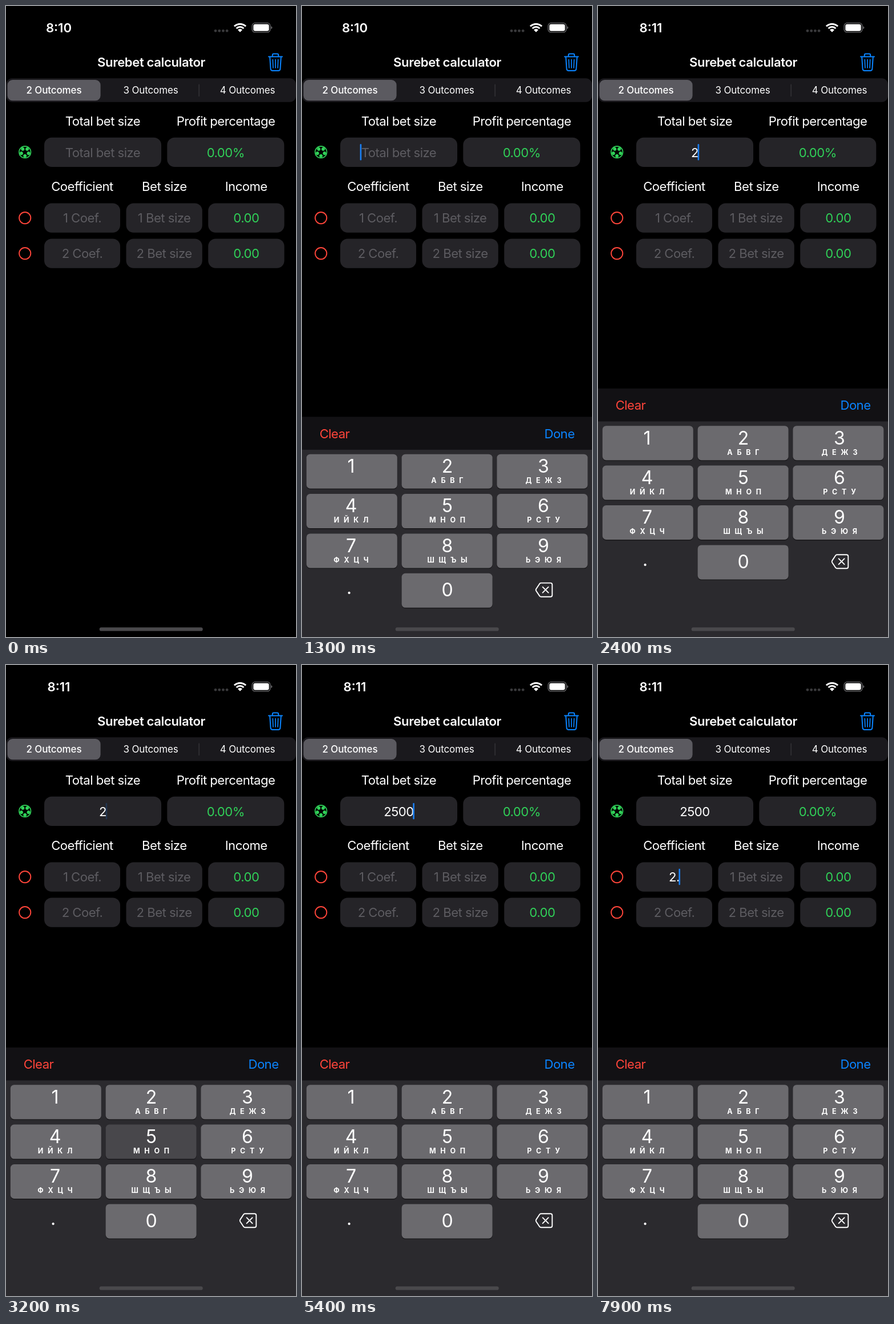
Animation of 508x1102 px, one loop 8 s. Source, as an HTML page:

```html
<!DOCTYPE html>
<html lang="en">
<head>
<meta charset="utf-8">
<title>Surebet calculator</title>
<style>
html, body { margin: 0; width: 100%; height: 100%; overflow: hidden; background: #000; }
svg { display: block; width: 100vw; height: 100vh; }
text { font-family: Inter, Roboto, sans-serif; font-size: 22.14px; letter-spacing: -.024em; fill: #fff; text-anchor: middle; white-space: pre; }
.title { font-weight: 600; letter-spacing: -.018em; }
.clock { font-weight: 600; letter-spacing: 0; }
.tab { font-size: 16.93px; letter-spacing: -.005em; }
.on { font-weight: 500; }
.hint { fill: #5d5c61; }
.num { fill: #30d158; }
.digit { font-size: 32px; letter-spacing: 0; }
.sub { font-size: 12.5px; font-weight: 700; letter-spacing: 2.4px; }
.red { fill: #ff453a; }
.blue { fill: #0a84ff; }
.line { fill: none; stroke-linecap: round; stroke-linejoin: round; }
</style>
</head>
<body>
<svg id="stage" viewBox="0 0 508 1102"></svg>
<script>
const LOOP = 8000, STEP = 100;
const KEYS_AT = 1096, KEYS_RISE = 434, SPRING = 18.26;
const MINUTE_AT = 2100;
const stage = document.getElementById('stage');

function add(parent, tag, attrs, content) {
  const el = document.createElementNS('http://www.w3.org/2000/svg', tag);
  for (const k in attrs) el.setAttribute(k, attrs[k]);
  if (content !== undefined) el.textContent = content;
  parent.appendChild(el);
  return el;
}
const rect = (p, x, y, width, height, rx, fill) => add(p, 'rect', { x, y, width, height, rx, fill });
const text = (p, x, y, s, cls = '') => add(p, 'text', { x, y, class: cls }, s);
const line = (p, d, stroke, width) => add(p, 'path', { d, stroke, 'stroke-width': width, class: 'line' });
const polar = (cx, cy, r, deg) => {
  const a = deg * Math.PI / 180;
  return [cx + r * Math.cos(a), cy + r * Math.sin(a)];
};

// Status bar
const clock = text(stage, 92.5, 46, '8:10', 'clock');
for (let i = 0; i < 4; i++) add(stage, 'circle', { cx: 367 + i * 6.7, cy: 43.3, r: 2.4, fill: '#3a3a3c' });
function arc(r, width) {
  const [x1, y1] = polar(410, 45.6, r, -135), [x2, y2] = polar(410, 45.6, r, -45);
  add(stage, 'path', { d: `M${x1} ${y1}A${r} ${r} 0 0 1 ${x2} ${y2}`, fill: 'none', stroke: '#fff', 'stroke-width': width });
}
arc(14.2, 3);
arc(9, 3);
add(stage, 'path', { d: 'M410 45.8L406 41.7A5.6 5.6 0 0 1 414 41.7Z', fill: '#fff' });
add(stage, 'rect', { x: 431.2, y: 29.7, width: 31.6, height: 16.2, rx: 5, fill: 'none', stroke: '#6c6c6f', 'stroke-width': 1.3 });
rect(stage, 433.3, 31.8, 27.4, 12, 3.2, '#fff');
add(stage, 'path', { d: 'M464.3 35.2Q466.4 36 466.4 37.8T464.3 40.4Z', fill: '#6c6c6f' });

// Title bar
text(stage, 254.5, 105.5, 'Surebet calculator', 'title');
line(stage, 'M460 88.6H484M466.8 88V85.5Q466.8 83.4 469 83.4H475Q477.2 83.4 477.2 85.5V88' +
  'M462.2 89L463.6 109.8Q463.8 113 467 113H477Q480.2 113 480.4 109.8L481.8 89', '#0a84ff', 2);
line(stage, 'M467.3 93.5L467.9 108M472 93.5V108M476.7 93.5L476.1 108', '#0a84ff', 1.7);

// Tabs
rect(stage, 0, 126.3, 508, 41.5, 11, '#1a191d');
rect(stage, 2.6, 129, 163, 36.3, 9, '#5b5a60');
rect(stage, 337.5, 136.5, 1.2, 21.5, .6, '#3b3a3e');
[2, 3, 4].forEach((n, i) => text(stage, 84 + i * 169.5, 153, n + ' Outcomes', i ? 'tab' : 'tab on'));

// Form
const field = (x, y, w, s, cls) => {
  rect(stage, x, y, w, 51.4, 13, '#252428');
  return text(stage, x + w / 2, y + 34, s, cls);
};
text(stage, 169.5, 208.5, 'Total bet size');
text(stage, 385, 208.5, 'Profit percentage');
const total = field(67, 229.7, 205, 'Total bet size', 'hint');
field(282.3, 229.7, 205, '0.00%', 'num');

text(stage, 133.5, 323.3, 'Coefficient');
text(stage, 277.3, 323.3, 'Bet size');
text(stage, 420.7, 323.3, 'Income');
const coefs = [1, 2].map(n => {
  const y = 344.4 + (n - 1) * 62;
  add(stage, 'circle', { cx: 33.2, cy: y + 25.7, r: 10.1, fill: 'none', stroke: '#ff453a', 'stroke-width': 1.9 });
  const coef = field(67, y, 133, n + ' Coef.', 'hint');
  field(210.5, y, 133.3, n + ' Bet size', 'hint');
  field(354.2, y, 133.3, '0.00', 'num');
  return coef;
});

// Ball: a ring with five patches around a dark centre
add(stage, 'circle', { cx: 33.2, cy: 255.2, r: 10.3, fill: 'none', stroke: '#30d158', 'stroke-width': 1.6 });
for (let i = 0; i < 5; i++) {
  const dir = 90 + i * 72, [cx, cy] = polar(33.2, 255.2, 6.6, dir);
  const pts = [0, 1, 2, 3, 4, 5].map(k => polar(cx, cy, 3.3, dir + 30 + k * 60).join());
  add(stage, 'polygon', { points: pts.join(' '), fill: '#30d158' });
}

const caret = rect(stage, 0, 0, 2.6, 28.5, 1.2, '#1a80f5');

// Keypad
const pad = add(stage, 'g', {});
rect(pad, 0, 668, 508, 60, 0, '#121114');
rect(pad, 0, 725.5, 508, 377, 0, '#2b2a2e');
text(pad, 57, 705.3, 'Clear', 'red');
text(pad, 451, 705.3, 'Done', 'blue');
const letters = ['', 'А Б В Г', 'Д Е Ж З', 'И Й К Л', 'М Н О П', 'Р С Т У', 'Ф Х Ц Ч', 'Ш Щ Ъ Ы', 'Ь Э Ю Я'];
const keys = {};
function key(n, col, row) {
  const x = 7.8 + col * 166.8, y = 733.2 + row * 69.4;
  rect(pad, x, y + 1.4, 159, 60, 6.5, '#19181b');
  keys[n] = rect(pad, x, y, 159, 60, 6.5, '#6b6a6e');
  const cx = 86 + col * 168.5;
  text(pad, cx, y + (n ? 32.3 : 48.6 - 8.2), n, 'digit');
  if (n > 1) text(pad, cx + 1.2, y + 50.4, letters[n - 1], 'sub');
}
for (let n = 1; n < 10; n++) key(n, (n - 1) % 3, Math.floor((n - 1) / 3));
key(0, 1, 3);
text(pad, 82.7, 977.5, '.', 'digit');
line(pad, 'M418.8 958.2H435.2Q438.3 958.2 438.3 961.3V979.2Q438.3 982.3 435.2 982.3H418.8Q417.4 982.3 416.4 981.2' +
  'L410.2 972Q409.2 970.3 410.2 968.6L416.4 959.3Q417.4 958.2 418.8 958.2Z', '#fff', 1.9);
line(pad, 'M421.6 965.2L431.6 975.2M431.6 965.2L421.6 975.2', '#fff', 1.9);

rect(stage, 163.7, 1085.2, 181, 6.3, 3.1, '#4a494c');

// time, total, coefficient, caret x, caret y
const edits = [
  [0, '', '', 0, 0],
  [1100, '', '', 101.6, 241],
  [2400, '2', '', 174.6, 241],
  [3400, '25', '', 181.3, 241],
  [4000, '250', '', 187.8, 241],
  [4400, '2500', '', 194.3, 241],
  [5800, '2500', '', 95.6, 355.7],
  [6900, '2500', '2', 138.8, 355.7],
  [7700, '2500', '2.', 141.4, 355.7]
];
// time pressed, key
const presses = [[2200, 2], [3200, 5], [3800, 0], [4200, 0], [6700, 2]];
const HOLD = 200;

const clamp = v => Math.max(0, Math.min(1, v));
function blink(age) {
  const a = age % 1000;
  return Math.max(clamp(1 - (a - 460) / 190), clamp((a - 760) / 200));
}
function fill(el, value, hint) {
  el.textContent = value || hint;
  el.setAttribute('class', value ? '' : 'hint');
}

function draw(t) {
  clock.textContent = t < MINUTE_AT ? '8:10' : '8:11';

  const wt = SPRING * Math.max(0, t - KEYS_AT) / 1000;
  pad.setAttribute('transform', `translate(0 ${(KEYS_RISE * (1 + wt) * Math.exp(-wt)).toFixed(2)})`);

  const [at, sum, coef, x, y] = edits.filter(e => e[0] <= t).pop();
  fill(total, sum, 'Total bet size');
  fill(coefs[0], coef, '1 Coef.');
  caret.setAttribute('x', x);
  caret.setAttribute('y', y);
  caret.setAttribute('opacity', at ? blink(t - at) : 0);

  const down = presses.find(p => t >= p[0] && t < p[0] + HOLD);
  for (const n in keys) keys[n].setAttribute('fill', down && down[1] == n ? '#48474b' : '#6b6a6e');
}

const start = performance.now();
function tick() {
  const t = (performance.now() - start) % LOOP;
  draw(Math.floor(t / STEP) * STEP);
  requestAnimationFrame(tick);
}
tick();
</script>
</body>
</html>
```
